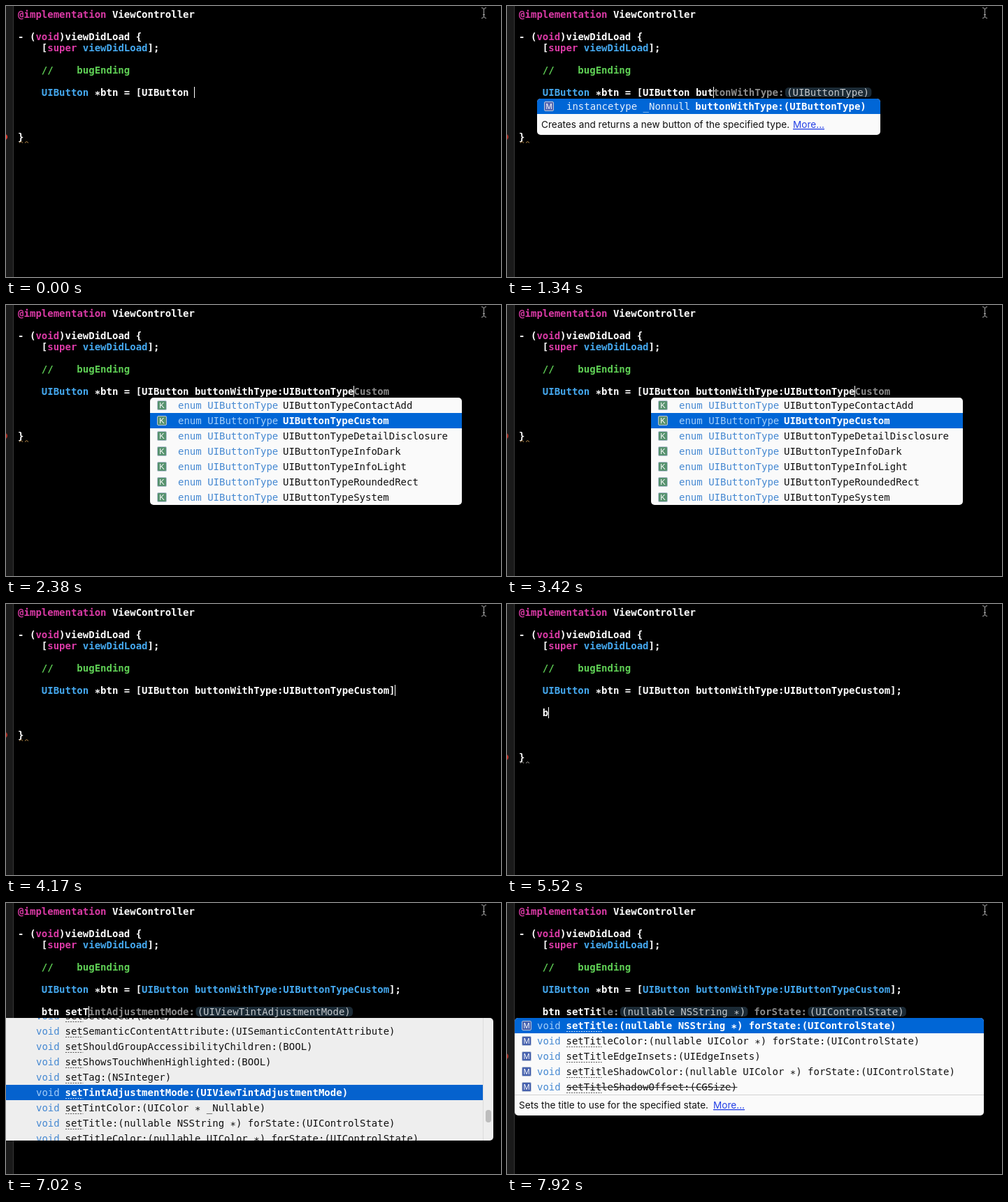
An HTML page for the animation above (8 s loop, 708 by 389 pixels).

```html
<!DOCTYPE html>
<html lang="en">
<head>
<meta charset="utf-8">
<title>Code completion</title>
<style>
  html, body { margin: 0; width: 100%; height: 100%; overflow: hidden; background: #000; }
  svg { display: block; width: 708px; height: 389px; }
  text { font: 14px "DejaVu Sans Mono", monospace; white-space: pre; }
  .bold { font-weight: bold; }
  .doc { font: 13.6px Inter, sans-serif; }
  .icon { font: 11px "Liberation Sans", sans-serif; text-anchor: middle; }
</style>
</head>
<body>
<svg id="stage" viewBox="0 0 708 389">
  <defs>
    <clipPath id="listClip"><path d="M0 165H692a5 5 0 0 1 5 5V336a5 5 0 0 1-5 5H0Z"/></clipPath>
  </defs>
  <rect width="708" height="389"/>
  <rect width="10" height="389" fill="#1a1a1a"/>
  <rect x="10" width="1" height="389" fill="#363636"/>
  <g id="scene"></g>
  <path d="M680 2.5q3.5 0 3.5 3 0-3 3.5-3M683.5 5V15M680 17.5q3.5 0 3.5-3 0 3 3.5 3M682 12.5h3" fill="none" stroke="#aaa"/>
</svg>
<script>
const LOOP = 8000, CHAR = 14 * 0.602, LEFT = 17.1, LINE = 16, ROW = 22;
const WHITE = '#fff', PINK = '#db3aa6', BLUE = '#45a9f0', GREEN = '#5fd055', GHOST = '#8c8c8c';
const PANEL = '#fafafa', SELECTED = '#0066d6', TYPE = '#4689d2', TYPE_SELECTED = '#a3cdf8';

const column = n => LEFT + n * CHAR;
const lineTop = n => 4 + n * LINE;
const baseline = n => 17 + n * LINE;

// The asterisk sits at mid height, as in Menlo.
const text = (x, y, s, fill, cls = '') =>
  `<text x="${x}" y="${y}" fill="${fill}" class="${cls}">` +
  s.replace(/\*([^*]?)/g, '<tspan dy="2.5">*</tspan><tspan dy="-2.5">$1</tspan>') + '</text>';
const rect = (x, y, w, h, fill, r = 0) =>
  `<rect x="${x}" y="${y}" width="${w}" height="${h}" rx="${r}" fill="${fill}"/>`;

function codeLine(line, col, parts) {
  return parts.map(([s, fill]) => {
    const out = text(column(col), baseline(line), s, fill, 'bold');
    col += s.length;
    return out;
  }).join('');
}

function highlight(s, resolved) {
  if (!resolved) return [[s, WHITE]];
  return s.split(/(\w+:\w+|UIButton(?= ))/).map((part, i) => [part, i % 2 ? BLUE : WHITE]);
}

// Parts that open with a parenthesis are placeholders and get a pill.
function ghostText(x, line, parts, active) {
  return parts.map(s => {
    const width = s.length * CHAR;
    if (s[0] !== '(') {
      const out = text(x, baseline(line), s, GHOST, 'bold');
      x += width;
      return out;
    }
    const out = rect(x + 1.5, lineTop(line) + 1, width + 5.5, 14, active ? '#2b5f9e' : '#1b2a35', 5) +
      text(x + 3.7, baseline(line), s, active ? WHITE : '#c3c8cc');
    x += width + 7.4;
    return out;
  }).join('');
}

const icon = (x, y, letter, fill) =>
  `<rect x="${x + .5}" y="${y + .5}" width="13" height="13" rx="1.5" fill="${fill}" stroke="#b9c4d6"/>` +
  text(x + 7, y + 11, letter, WHITE, 'icon');

const selectedTop = (x, y, w) =>
  `<path d="M${x} ${y + ROW}v-17a5 5 0 0 1 5-5h${w - 10}a5 5 0 0 1 5 5v17z" fill="${SELECTED}"/>`;

const prefixMark = (y, n, fill) =>
  `<path d="M85 ${y + 3.5}h${n * CHAR}" stroke="${fill}" stroke-dasharray="2 1.5"/>`;

const docs = (x, y, s, linkX) =>
  text(x, y, s, '#111', 'doc') +
  `<text x="${linkX}" y="${y}" fill="#2440e6" class="doc" text-decoration="underline">More...</text>`;

function methodPopup() {
  return rect(43, 133, 491, 52, PANEL, 5) + selectedTop(43, 133, 491) +
    icon(53, 137, 'M', '#5468b4') +
    text(85, 149, 'instancetype _Nonnull', '#e4effc') +
    text(column(30) - .6, 149, 'buttonWithType:(UIButtonType)', WHITE, 'bold') +
    docs(49, 175, 'Creates and returns a new button of the specified type.', 409);
}

function enumPopup(chosen) {
  const names = ['ContactAdd', 'Custom', 'DetailDisclosure', 'InfoDark', 'InfoLight', 'RoundedRect', 'System'];
  return rect(206, 133, 446, 154, PANEL, 5) + names.map((name, i) => {
    const top = 133 + i * ROW, on = i === chosen;
    return (on ? rect(206, top, 446, ROW, SELECTED) : '') +
      icon(216, top + 4, 'K', '#57926f') +
      text(246, top + 16, 'enum UIButtonType', on ? TYPE_SELECTED : TYPE) +
      text(396, top + 16, 'UIButtonType' + name, on ? WHITE : '#111', on ? 'bold' : '');
  }).join('');
}

function variablePopup() {
  return rect(-60, 165, 359, ROW, SELECTED, 5) +
    text(column(4) - 11 * CHAR, 181, 'UIButton *', TYPE_SELECTED) +
    text(column(4), 181, 'btn', WHITE, 'bold');
}

function setterRow(y, name, on, prefix) {
  return text(43, y, 'void', on ? TYPE_SELECTED : TYPE) +
    text(84.5, y, name, on ? WHITE : '#111', on ? 'bold' : '') +
    prefixMark(y, prefix, on ? '#d5e6fa' : '#555');
}

function scrollingPopup() {
  const names = ['setSelected:(BOOL)', 'setSemanticContentAttribute:(UISemanticContentAttribute)',
    'setShouldGroupAccessibilityChildren:(BOOL)', 'setShowsTouchWhenHighlighted:(BOOL)',
    'setTag:(NSInteger)', 'setTintAdjustmentMode:(UIViewTintAdjustmentMode)',
    'setTintColor:(UIColor * _Nullable)', 'setTitle:(nullable NSString *) forState:(UIControlState)',
    'setTitleColor:(nullable UIColor *) forState:(UIControlState)'];
  return '<g clip-path="url(#listClip)">' + rect(0, 165, 697, 176, '#eee') +
    rect(682, 165, 1, 176, '#dcdcdc') + rect(686, 297, 8, 18, '#bdbdbd', 4) +
    rect(0, 261, 682, ROW, '#0562ce') +
    names.map((name, i) => setterRow(167 + i * ROW, name, i === 5, 3)).join('') + '</g>';
}

function titlePopup() {
  const names = ['setTitle:(nullable NSString *) forState:(UIControlState)',
    'setTitleColor:(nullable UIColor *) forState:(UIControlState)', 'setTitleEdgeInsets:(UIEdgeInsets)',
    'setTitleShadowColor:(nullable UIColor *) forState:(UIControlState)', 'setTitleShadowOffset:(CGSize)'];
  return rect(11, 165, 671, 140, PANEL, 5) + selectedTop(11, 165, 671) +
    names.map((name, i) => icon(21, 169 + i * ROW, 'M', '#4560ad') +
      setterRow(181 + i * ROW, name, i === 0, 6)).join('') +
    rect(85, 264, names[4].length * CHAR, 1, '#222') +
    rect(11, 275, 671, 1, '#d2d2d2') +
    docs(17, 295, 'Sets the title to use for the specified state.', 295);
}

const CALL = '[UIButton ', WITH = CALL + 'buttonWithType:', FULL = WITH + 'UIButtonTypeCustom';
const TINT = '(UIViewTintAdjustmentMode)';
const none = { ghost: [], popup: null };

// Each step lists only what changes at its time.
const steps = [
  [0, { call: CALL, statement: '', line: 7, brace: 11, caret: true, dot: '#e0392d', marks: '#c0914c', ...none }],
  [450, { caret: false }],
  [1050, { caret: true, call: CALL + 'b', dot: '#a82c22' }],
  [1200, { call: CALL + 'bu', ghost: ['ttonWithType:', '(UIButtonType)'], popup: methodPopup }],
  [1340, { call: CALL + 'but', ghost: ['tonWithType:', '(UIButtonType)'] }],
  [1940, { call: WITH, ghost: ['(UIButtonType)'], popup: null, active: true, caret: false }],
  [2090, { call: WITH + 'UI', ghost: [], active: false, caret: true }],
  [2230, { call: WITH + 'UIButtonType' }],
  [2380, { ghost: ['Custom'], popup: () => enumPopup(1) }],
  [2680, { popup: () => enumPopup(2) }],
  [2820, { ghost: ['DetailDisclosure'] }],
  [3420, { ghost: ['Custom'], popup: () => enumPopup(1) }],
  [4020, { call: FULL, ...none }],
  [4170, { call: FULL + ']' }],
  [4320, { call: FULL + '];' }],
  [4620, { line: 8, brace: 12, dot: '#c23228', marks: '#a5a29c' }],
  [5070, { line: 9, brace: 13 }],
  [5520, { statement: 'b' }],
  [5670, { statement: 'bt', ghost: ['n'], popup: variablePopup }],
  [5820, { statement: 'btn', ghost: [] }],
  [6420, { statement: 'btn s', resolved: true, popup: null }],
  [6570, { statement: 'btn se', ghost: ['tTintAdjustmentMode:', TINT], popup: scrollingPopup }],
  [6720, { statement: 'btn set', ghost: ['TintAdjustmentMode:', TINT] }],
  [7020, { statement: 'btn setT', ghost: ['intAdjustmentMode:', TINT] }],
  [7170, { statement: 'btn setTi', ghost: ['ntAdjustmentMode:', TINT] }],
  [7320, { statement: 'btn setTit', dot: '#a82c22', popup: titlePopup,
    ghost: ['le:', '(nullable NSString *)', ' forState:', '(UIControlState)'] }],
  [7920, { caret: false }]
];

const header =
  codeLine(0, 0, [['@implementation', PINK], [' ViewController', WHITE]]) +
  codeLine(2, 0, [['- (', WHITE], ['void', PINK], [')viewDidLoad {', WHITE]]) +
  codeLine(3, 4, [['[', WHITE], ['super', PINK], [' viewDidLoad', BLUE], ['];', WHITE]]) +
  codeLine(5, 4, [['//    bugEnding', GREEN]]);

function draw(s) {
  const end = s.line === 7 ? 20 + s.call.length : 4 + s.statement.length;
  const x = column(end), y = baseline(s.brace);
  return header +
    codeLine(7, 4, [['UIButton', BLUE], [' *btn = ', WHITE], ...highlight(s.call, s.resolved)]) +
    codeLine(9, 4, [[s.statement, WHITE]]) +
    codeLine(s.brace, 0, [['}', WHITE]]) +
    `<path d="M19 ${y + 3.5}l2.5-2 2.5 2m3 0l2.5-2 2.5 2" fill="none" stroke="${s.marks}"/>` +
    `<circle cx="-2" cy="${y - 5}" r="4.2" fill="${s.dot}"/>` +
    ghostText(x, s.line, s.ghost, s.active) +
    (s.caret ? rect(Math.floor(x), lineTop(s.line), 1, LINE, WHITE) : '') +
    (s.popup ? s.popup() : '');
}

const scene = document.getElementById('scene');
let shown = -1;

function render(time) {
  const count = steps.filter(([at]) => at <= time).length;
  if (count === shown) return;
  shown = count;
  scene.innerHTML = draw(Object.assign({}, ...steps.slice(0, count).map(step => step[1])));
}

const start = performance.now();
function tick() {
  render((performance.now() - start) % LOOP);
  requestAnimationFrame(tick);
}
tick();
</script>
</body>
</html>
```
